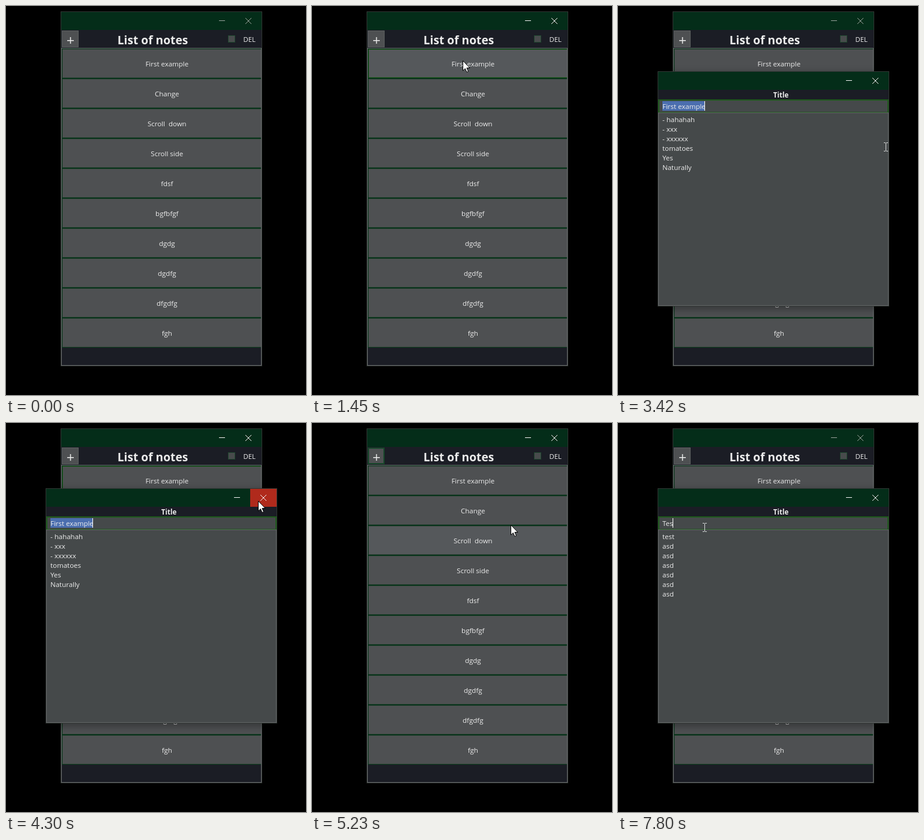
Recreate the animation shown at these times as an HTML page with a canvas. Size 500x650 px, loop 7990 ms.

```html
<!DOCTYPE html>
<html lang="en">
<head>
<meta charset="utf-8">
<title>Notes</title>
<style>
  html, body { margin: 0; width: 100%; height: 100%; overflow: hidden; background: #000; }
  canvas { display: block; }
</style>
</head>
<body>
<canvas id="stage" width="500" height="650"></canvas>
<script>
const LOOP = 7990;
const FONT = '"Open Sans", "Noto Sans", sans-serif';
const C = {
  bar: '#042d19', head: '#1b1d25', row: '#4e5052', hover: '#55585b',
  line: '#07331a', focus: '#1f5a1c', edge: '#696b6d', field: '#45494a',
  blank: '#3c3f41', text: '#ececec', select: '#4b6eaf'
};
const ROWS = ['First example', 'Change', 'Scroll  down', 'Scroll side', 'fdsf',
  'bgfbfgf', 'dgdg', 'dgdfg', 'dfgdfg', 'fgh'];
const NOTES = [
  { title: 'First example', width: 70,
    lines: ['- hahahah', '- xxx', '- xxxxxx', 'tomatoes', 'Yes', 'Naturally'] },
  { title: 'Change', width: 41,
    lines: ['test', 'asd', 'asd', 'asd', 'asd', 'asd', 'asd'] }
];

// Pointer path: time, x, y
const PATH = [
  [640, 238, 628], [800, 238, 490], [1000, 240, 335], [1200, 245, 195], [1400, 251, 91],
  [1510, 251, 91], [1700, 305, 135], [1900, 405, 218], [2110, 455, 252], [3260, 455, 252],
  [3480, 441, 224], [3680, 424, 166], [3890, 420, 130], [4350, 420, 130], [4600, 428, 165],
  [4800, 432, 212], [4950, 434, 236], [5090, 385, 232], [5170, 345, 210], [5230, 331, 170],
  [5450, 262, 144], [5700, 215, 142], [5940, 201, 247], [6250, 165, 210],
  [6550, 144, 176], [6650, 144, 176], [6760, 144, 174], [LOOP, 144, 174]
];

const stage = document.getElementById('stage');
const screen = stage.getContext('2d');
const layer = document.createElement('canvas');
layer.width = stage.width;
layer.height = stage.height;
const sheet = layer.getContext('2d');

const within = (t, a, b) => t >= a && t < b;
const clamp = v => Math.max(0, Math.min(1, v));
const easeOut = v => 1 - (1 - clamp(v)) ** 3;

function box(g, x, y, w, h, fill) {
  g.fillStyle = fill;
  g.fillRect(x, y, w, h);
}

function frame(g, x, y, w, h, color, size = 1) {
  g.strokeStyle = color;
  g.lineWidth = size;
  g.strokeRect(x + size / 2, y + size / 2, w - size, h - size);
}

function label(g, text, x, y, { size = 11.5, weight = 400, align = 'left' } = {}) {
  g.font = `${weight} ${size}px ${FONT}`;
  g.textAlign = align;
  g.fillStyle = C.text;
  g.fillText(text, x, y);
}

function lines(g, color, ...segments) {
  g.strokeStyle = color;
  g.lineWidth = 1;
  g.beginPath();
  for (const [x1, y1, x2, y2] of segments) {
    g.moveTo(x1, y1);
    g.lineTo(x2, y2);
  }
  g.stroke();
}

function titleBar(g, x, y, w, active, closeFill) {
  box(g, x, y, w, 30, C.bar);
  const right = x + w;
  if (closeFill) box(g, right - 44, y, 44, 30, closeFill);
  const cx = right - 22, cy = y + 15;
  lines(g, active ? '#f4f4f4' : '#98a39d',
    [cx - 49, cy - 0.5, cx - 39, cy - 0.5],
    [cx - 5, cy - 5, cx + 5, cy + 5],
    [cx - 5, cy + 5, cx + 5, cy - 5]);
}

// Slope that keeps the path free of overshoot
function slope(i, k) {
  if (i === 0 || i === PATH.length - 1) return 0;
  const [a, b, c] = [PATH[i - 1], PATH[i], PATH[i + 1]];
  const p = (b[k] - a[k]) / (b[0] - a[0]);
  const q = (c[k] - b[k]) / (c[0] - b[0]);
  return p * q <= 0 ? 0 : 2 * p * q / (p + q);
}

function pointerAt(t) {
  if (t < PATH[0][0]) return null;
  let i = 0;
  while (i < PATH.length - 2 && t >= PATH[i + 1][0]) i++;
  const a = PATH[i], b = PATH[i + 1], d = b[0] - a[0];
  const u = clamp((t - a[0]) / d), u2 = u * u, u3 = u2 * u;
  const at = k => (2 * u3 - 3 * u2 + 1) * a[k] + (u3 - 2 * u2 + u) * d * slope(i, k)
    + (3 * u2 - 2 * u3) * b[k] + (u3 - u2) * d * slope(i + 1, k);
  return { x: Math.round(at(1)), y: Math.round(at(2)) };
}

function dialogAt(t) {
  if (within(t, 1560, 4500)) {
    const opening = easeOut((t - 1560) / 190);
    const closing = clamp((t - 4310) / 190);
    return {
      note: NOTES[0], ready: t >= 1780, active: true, typed: '',
      alpha: opening * (1 - closing), scale: 0.9 + 0.1 * opening - 0.08 * closing,
      caret: !within(t, 2580, 3080) && !within(t, 3580, 4150)
    };
  }
  if (t >= 5740) {
    const opening = easeOut((t - 5740) / 190);
    const count = [7490, 7650, 7800].filter(at => t >= at).length;
    return {
      note: NOTES[1], ready: t >= 5960, active: true, typed: 'Tes'.slice(0, count),
      alpha: opening, scale: 0.9 + 0.1 * opening,
      caret: !within(t, 6260, 6760) && !within(t, 7260, 7490)
    };
  }
  return null;
}

function focusAt(t) {
  if (within(t, 1350, 1800) || within(t, 4250, 4700)) return 0;
  if (within(t, 4700, 5690)) return 'add';
  return within(t, 5690, 5960) ? 1 : null;
}

function drawMain(g, t, pointer, hasDialog) {
  const focus = focusAt(t);
  const active = within(t, 1350, 1790) || within(t, 4250, 5960);
  box(g, 91, 9, 336, 593, '#303633');
  titleBar(g, 92, 10, 334, active);
  box(g, 92, 40, 334, 561, C.head);

  box(g, 93, 41, 28, 28, C.row);
  if (focus === 'add') frame(g, 93, 41, 28, 28, '#17472a', 2);
  else frame(g, 93, 41, 28, 28, '#5c6060');
  box(g, 102, 57, 11, 1.5, C.text);
  box(g, 106.75, 52, 1.5, 11, C.text);
  label(g, 'List of notes', 244.5, 64, { size: 19.2, weight: 700, align: 'center' });
  box(g, 370, 49, 12, 12, '#484b4c');
  frame(g, 370, 49, 12, 12, '#20482f');
  label(g, 'DEL', 395.5, 60, { size: 11.3 });

  frame(g, 92, 70, 334, 531, C.edge);
  const over = pointer && !hasDialog && within(pointer.x, 94, 425)
    ? Math.floor((pointer.y - 71) / 50 + 0.02) : -1;
  ROWS.forEach((name, i) => {
    const y = 71 + i * 50;
    box(g, 93, y, 332, 50, C.line);
    box(g, 94, y + 1, 331, 48, i === over ? C.hover : C.row);
    frame(g, 94, y + 1, 332, 48, i === focus ? C.focus : '#3f4b44');
    label(g, name, 268.3, y + 30, { align: 'center' });
  });
  box(g, 425, 70, 1, 531, C.edge);
}

function drawDialog(g, d, t, pointer) {
  g.clearRect(0, 0, 500, 650);
  box(g, 66, 109, 386, 393, '#303633');
  if (!d.ready) {
    box(g, 67, 110, 384, 391, C.blank);
    return;
  }
  const onClose = pointer && within(pointer.x, 407, 451) && within(pointer.y, 110, 140);
  titleBar(g, 67, 110, 384, d.active, onClose && (t < 4150 ? '#c42b1c' : '#b02a1c'));
  box(g, 67, 140, 384, 361, C.head);
  label(g, 'Title', 271.5, 153, { weight: 700, align: 'center' });

  box(g, 67, 156, 384, 23, C.field);
  frame(g, 67, 156, 384, 23, C.focus, 2);
  const text = d.typed || d.note.title;
  if (!d.typed) box(g, 74, 159, d.note.width, 16, C.select);
  label(g, text, 74, 172);
  const end = d.typed ? [80, 86, 91][d.typed.length - 1] : 74 + d.note.width;
  if (d.caret) box(g, end, 159, 1, 16, '#fff');

  box(g, 67, 179, 384, 322, C.field);
  frame(g, 67, 178, 384, 323, '#646668');
  d.note.lines.forEach((line, i) => label(g, line, 74, 194 + i * 16));
}

function placeDialog(g, d) {
  g.save();
  g.globalAlpha = d.alpha;
  g.shadowColor = 'rgba(0,0,0,.35)';
  g.shadowBlur = 14;
  g.shadowOffsetY = 4;
  g.translate(259, 305.5);
  g.scale(d.scale, d.scale);
  g.drawImage(layer, -259, -305.5);
  g.restore();
}

function drawArrow(g, { x, y }) {
  const outline = [[0, 0], [0, 16.5], [3.8, 13], [6.4, 19], [9, 17.9], [6.4, 12], [11.5, 12]];
  g.beginPath();
  outline.forEach(([dx, dy]) => g.lineTo(x + 0.5 + dx, y + 0.5 + dy));
  g.closePath();
  g.fillStyle = '#fff';
  g.fill();
  g.strokeStyle = '#000';
  g.lineWidth = 1;
  g.stroke();
}

function drawBeam(g, { x, y }) {
  lines(g, '#d5d8d8',
    [x + 0.5, y - 6, x + 0.5, y + 7],
    [x - 3, y - 6.5, x, y - 6.5], [x + 1, y - 6.5, x + 4, y - 6.5],
    [x - 3, y + 7.5, x, y + 7.5], [x + 1, y + 7.5, x + 4, y + 7.5]);
}

function render(t) {
  const pointer = pointerAt(t);
  const dialog = dialogAt(t);
  box(screen, 0, 0, 500, 650, '#000');
  drawMain(screen, t, pointer, !!dialog);
  if (dialog) {
    drawDialog(sheet, dialog, t, pointer);
    placeDialog(screen, dialog);
  }
  if (!pointer) return;
  const overText = dialog && dialog.ready && t < 4310 | t > 5900
    && within(pointer.x, 67, 451) && within(pointer.y, 156, 501);
  (overText ? drawBeam : drawArrow)(screen, pointer);
}

const start = performance.now();
function tick() {
  render((performance.now() - start) % LOOP);
  requestAnimationFrame(tick);
}
tick();
</script>
</body>
</html>
```
